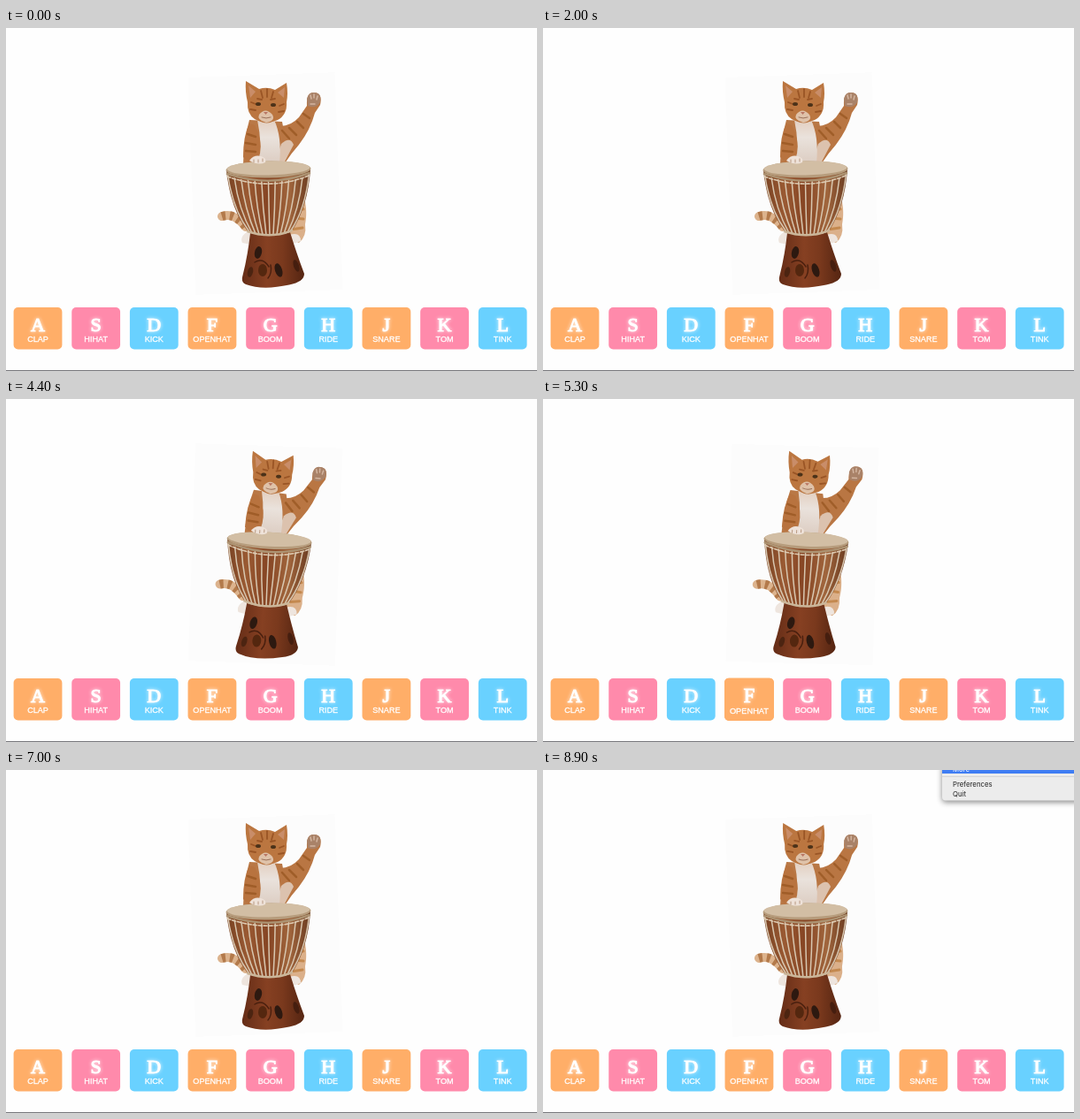
An HTML page for the animation above (9000 ms loop, 600 by 388 pixels).

```html
<!DOCTYPE html>
<html lang="en">
<head>
<meta charset="utf-8">
<title>Drum kit</title>
<style>
html, body { margin: 0; width: 100%; height: 100%; overflow: hidden; background: #fefefe; }
svg { display: block; width: 600px; height: 388px; }
.key { fill: #fff; text-anchor: middle; }
.letter { font: 22px "Liberation Serif", "Times New Roman", serif; stroke: #fff; stroke-width: 1.1px; filter: drop-shadow(0 0 2px #fffc); }
.label { font: 9.1px "Liberation Sans", Arial, sans-serif; stroke: #fff; stroke-width: .3px; }
#menu text { font: 7.8px Inter, Roboto, sans-serif; fill: #222; }
</style>
</head>
<body>
<svg viewBox="0 0 600 388">
  <defs>
    <linearGradient id="shell">
      <stop offset="0" stop-color="#774122"/><stop offset=".25" stop-color="#9a5a33"/>
      <stop offset=".5" stop-color="#854423"/><stop offset=".75" stop-color="#a1663d"/>
      <stop offset="1" stop-color="#693a20"/>
    </linearGradient>
    <linearGradient id="foot">
      <stop offset="0" stop-color="#652d17"/><stop offset=".4" stop-color="#864022"/>
      <stop offset=".65" stop-color="#7a391d"/><stop offset="1" stop-color="#552512"/>
    </linearGradient>
    <linearGradient id="chest" x2="0" y2="1">
      <stop offset="0" stop-color="#e3cfc0"/><stop offset=".4" stop-color="#eae2dc"/>
      <stop offset="1" stop-color="#dccdc2"/>
    </linearGradient>
  </defs>

  <g id="cat" stroke-linecap="round">
    <rect x="210" y="53" width="166" height="246" fill="#fcfcfc" transform="rotate(-2 294 176)"/>

    <!-- tail and haunches -->
    <g fill="none" stroke-width="10">
      <path d="M244 213C254 210 262 214 271 225" stroke="#dcb38d"/>
      <path d="M244 213C254 210 262 214 271 225" stroke="#b37a4b" stroke-dasharray="4 5" stroke-linecap="butt"/>
    </g>
    <path d="M322 172C337 178 342 205 338 222Q340 236 331 243L318 238Z" fill="#dbb08a"/>
    <path d="M327 190l6 2M327 203l9 2M325 215l11 1M322 228l13-2" stroke="#c4894f" stroke-width="3"/>
    <path d="M320 234Q333 230 333 241L322 245ZM278 228Q263 234 267 243L277 245Z" fill="#eee5de"/>

    <!-- torso and arms -->
    <path d="M275 104Q269 124 268 154H314Q319 140 312 106Z" fill="#b97846"/>
    <path d="M303 110Q319 114 331 101L340 88Q339 73 348 73Q358 73 355 87L349 96Q344 115 331 132Q322 142 315 153L307 142Z" fill="#b97643"/>
    <path d="M311 131Q321 122 325 132L314 153H304Z" fill="#dcc2ae"/>
    <path d="M284 104Q296 111 303 104Q312 123 309 153H285Q290 132 284 104Z" fill="url(#chest)"/>
    <path d="M281 110Q290 126 287 142L275 153L268 146Q268 122 275 108Z" fill="#b8733f"/>
    <path d="M273 120l9 3M271 130l11 2M271 139l11 1M312 116l8 9M320 113l8 8M329 106l7 7M336 97l7 5" fill="none" stroke="#96551f" stroke-opacity=".7" stroke-width="2.5"/>
    <path d="M340 80Q342 72 348 73Q357 73 355 84Q350 92 341 88Z" fill="#a98268"/>
    <path d="M344 76l1 4M348 75v4M352 77l-1 4M344 86h5" stroke="#d3b5a0" stroke-width="1.500"/>

    <!-- head -->
    <path d="M271 60L286 69Q295 66 304 70L317 62Q319 74 317 84Q318 98 307 104Q294 110 281 103Q272 97 273 84Q270 72 271 60Z" fill="#bb7640"/>
    <path d="M274 65l8 7-6 7ZM315 67l-8 6 7 6Z" fill="#c98d69"/>
    <path d="M286 98Q293 89 301 98Q305 105 294 107Q283 104 286 98Z" fill="#dfc2a9"/>
    <path d="M288 71l2 8M295 69v9M302 72l-2 7M277 84l5 2M276 92l6 1M314 86l-5 2M314 94l-6 1M284 80l5 1M304 80l-5 1" stroke="#8c481b" stroke-opacity=".7" stroke-width="1.800"/>
    <ellipse cx="285" cy="86" rx="3" ry="2" fill="#4b3219"/>
    <ellipse cx="302" cy="87" rx="3" ry="2" fill="#4b3219"/>
    <path d="M291 95h5l-2.500 3Z" fill="#b87562"/>
    <path d="M289 101q5 2 10 0" fill="none" stroke="#9b715a"/>

    <!-- drum -->
    <path d="M249 161Q254 206 273 230Q298 239 323 230Q341 202 344 160Z" fill="url(#shell)"/>
    <g id="ropes" fill="none" stroke="#d8c7b0" stroke-width="1.500"/>
    <path d="M250 165Q298 181 343 164" fill="none" stroke="#ac9271" stroke-width="2.500"/>
    <path d="M250 168Q298 185 342 167" fill="none" stroke="#ddcbb2" stroke-width="1.600" stroke-dasharray="4 2"/>
    <ellipse cx="296.500" cy="160" rx="48" ry="9.500" fill="#b69c7c" transform="rotate(-1 296 160)"/>
    <ellipse cx="296.500" cy="158.500" rx="47" ry="8" fill="#d2bea4" transform="rotate(-1 296 159)"/>
    <path d="M275 150Q280 143 288 145Q295 147 293 152Q285 156 275 150Z" fill="#eee2d9"/>
    <path d="M280 149v3M285 149v3M290 148v3" stroke="#b89880"/>
    <path d="M276 232Q299 238 321 231Q329 257 337 278Q337 287 320 290.500Q290 297 271 290Q266 288 267 282Q273 259 276 232Z" fill="url(#foot)"/>
    <path d="M273 230Q299 239 323 229" fill="none" stroke="#cbb699" stroke-width="2.500" stroke-dasharray="4 1"/>
    <g fill="#2d1910">
      <ellipse cx="285" cy="254" rx="4" ry="7" transform="rotate(12 285 254)"/>
      <ellipse cx="308" cy="274" rx="4" ry="8" transform="rotate(-18 308 274)"/>
      <ellipse cx="290" cy="274" rx="5" ry="7" fill="#54270f"/>
      <ellipse cx="328" cy="269" rx="3" ry="7" transform="rotate(-18 328 269)" fill="#451e0f"/>
      <ellipse cx="276" cy="276" rx="3" ry="6" transform="rotate(14 276 276)" fill="#4c2411"/>
    </g>
    <path d="M281 265q9-6 16 5M296 283q5-6 3-15" fill="none" stroke="#4a200f" stroke-width="1.500"/>
  </g>

  <g id="keys"></g>
  <path d="M0 387.500H600" stroke="#77777c"/>

  <g id="menu">
    <path d="M451 -6H610V34.500H455Q451 34.500 451 30.500Z" fill="#ececec" style="filter:drop-shadow(0 2px 3px #0007)"/>
    <g id="active">
      <path d="M451 0H600V4H451Z" fill="#3f7df3"/>
      <text x="463" y="1.500" style="fill:#fff">More</text>
    </g>
    <path d="M451 7.500H600" stroke="#d6d6d6"/>
    <text x="463" y="18.500">Preferences</text>
    <text x="463" y="29.500">Quit</text>
  </g>
</svg>
<script>
const $ = id => document.getElementById(id);
const LOOP = 9000, STEP = 100;
const colors = ['#ffae68', '#ff8aab', '#69d1ff'];
const labels = { A: 'CLAP', S: 'HIHAT', D: 'KICK', F: 'OPENHAT', G: 'BOOM', H: 'RIDE', J: 'SNARE', K: 'TOM', L: 'TINK' };
const hits = [['A', 300], ['S', 700], ['D', 1400], ['H', 2500], ['L', 3700], ['L', 4500], ['F', 5200], ['G', 6400]];
const pressCurve = [1, .2];

// Cords bulge with the shell from the rim down to the lower ring
$('ropes').innerHTML = Array.from({ length: 13 }, (_, i) => {
  const u = i / 6 - 1, arc = Math.sqrt(1 - u * u);
  return `<path d="M${296.5 + 46 * u} ${165 + 9 * arc}Q${297 + 41 * u} 205 ${298 + 24 * u} ${229 + 5 * arc}"/>`;
}).join('');

$('keys').innerHTML = Object.entries(labels).map(([letter, label], i) => `
  <g class="key" id="key${letter}">
    <rect x="-27.4" y="-23.7" width="54.800" height="47.400" rx="5" fill="${colors[i % 3]}"/>
    <text class="letter" y="3">${letter}</text>
    <text class="label" y="15.400">${label}</text>
  </g>`).join('');

// The CSS "ease" curve, solved by bisection
function ease(x) {
  let lo = 0, hi = 1, u;
  for (let i = 0; i < 20; i++) {
    u = (lo + hi) / 2;
    const v = 1 - u;
    if (.75 * u * v * v + .75 * u * u * v + u ** 3 < x) lo = u; else hi = u;
  }
  return .3 * u * (1 - u) ** 2 + 3 * u * u * (1 - u) + u ** 3;
}

function draw(t) {
  const phase = t % 1000 / 500;
  const tilt = phase < 1 ? ease(phase) : 1 - ease(phase - 1);
  $('cat').setAttribute('transform', `rotate(${4 * tilt} 294 176)`);

  Object.keys(labels).forEach((letter, i) => {
    const hit = hits.find(([k, at]) => k === letter && t >= at && t < at + pressCurve.length * STEP);
    const press = hit ? pressCurve[(t - hit[1]) / STEP] : 0;
    const key = $('key' + letter);
    key.setAttribute('transform', `translate(${36 + 65.65 * i} 339.8) scale(${1 + .1 * press})`);
    key.style.filter = press ? `drop-shadow(0 0 ${3 * press}px ${colors[i % 3]})` : '';
  });

  $('menu').style.display = t >= 7800 ? '' : 'none';
  $('active').style.display = t >= 8600 ? '' : 'none';
}

const start = performance.now();
function tick() {
  const t = (performance.now() - start) % LOOP;
  draw(Math.floor(t / STEP) * STEP);
  requestAnimationFrame(tick);
}
tick();
</script>
</body>
</html>
```
